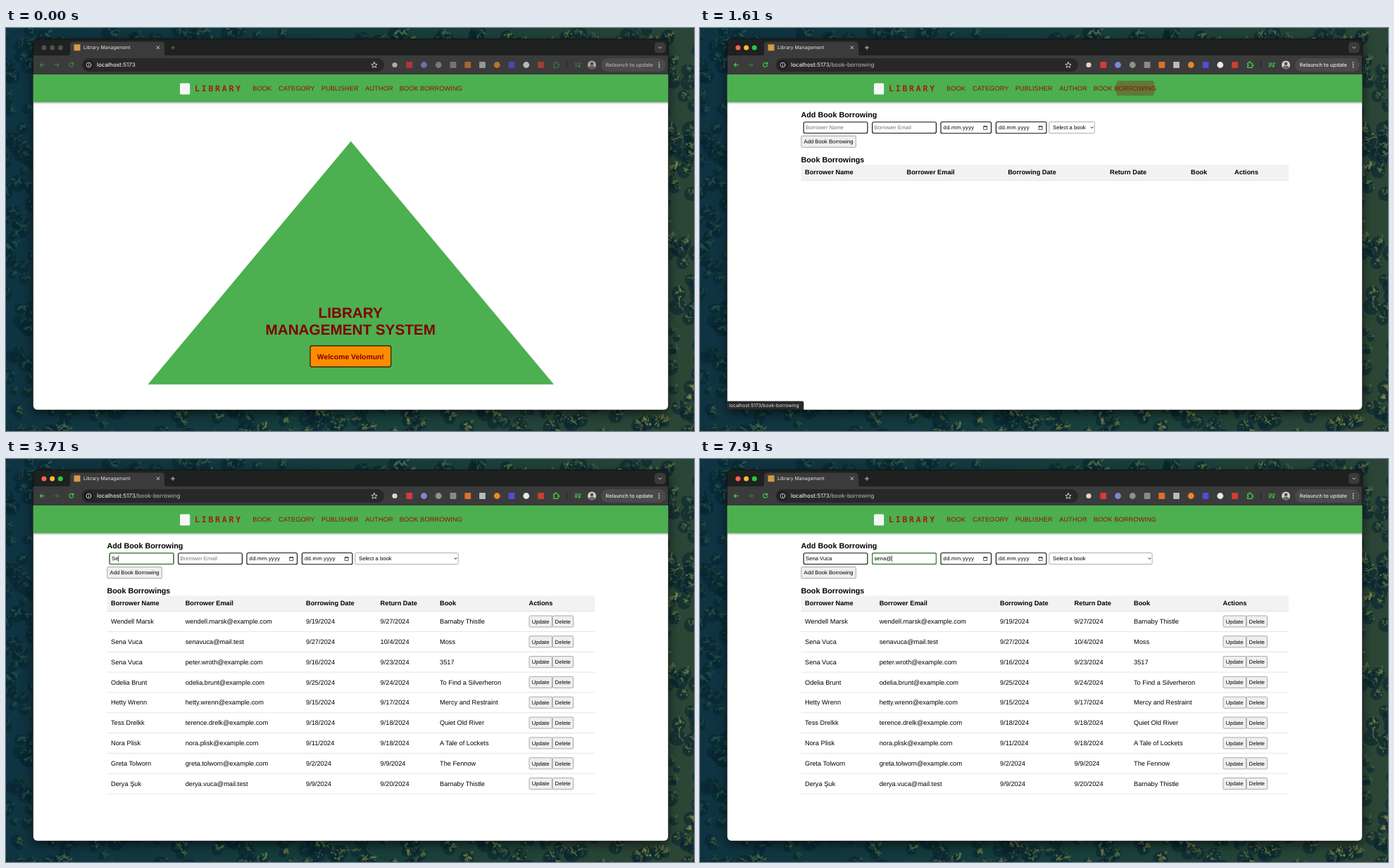
An HTML page with a canvas for the animation above (8000 ms loop, 977 px wide and 573 px high).

```html
<!DOCTYPE html>
<html lang="en">
<head>
<meta charset="utf-8">
<title>Library Management</title>
<style>
  html, body { margin: 0; width: 100%; height: 100%; overflow: hidden; background: #12333a; }
  canvas, svg { position: absolute; left: 0; top: 0; width: 977px; height: 573px; }
  svg text { white-space: pre; text-rendering: geometricPrecision; font-family: "Liberation Sans", Arial, sans-serif; }
  .shadow { filter: drop-shadow(0 5px 8px rgba(0, 0, 0, .6)); }
  .ui text { font-family: Inter, sans-serif; fill: #e8e8e8; }
  .line { fill: none; stroke: #dcdcdc; stroke-width: .9; stroke-linecap: round; stroke-linejoin: round; }
  .go { stroke: #3fd64a; stroke-width: 1.1; }
  .idle .go { stroke: #3c8a44; }
  .idle .lights circle { fill: #505050; }
  .idle .ext { opacity: .72; }
  .idle .relaunch text { fill: #b2b2b2; }
  .bar { fill: #4caf50; filter: drop-shadow(0 1.2px 1.6px rgba(0, 0, 0, .42)); }
  .nav { font-size: 9.23px; letter-spacing: .087px; fill: #930f05; }
  .brand { font: 700 11.5px "DejaVu Sans Mono", monospace !important; letter-spacing: 2.77px; fill: #a31c0b; }
  .hero { font-weight: 700; font-size: 20.7px; fill: #800000; text-anchor: middle; }
  .h3 { font-weight: 700; font-size: 10.79px; }
  .cell { font-size: 9.226px; }
  .th { font-weight: 700; }
  .small { font-size: 7.69px; }
  .hint { fill: #757575; }
  .field { fill: #fff; stroke: #111; stroke-width: 1.15; }
  .focus { fill: #fff; stroke: #43853d; stroke-width: 1.4; }
  .btn { fill: #efefef; stroke: #767676; stroke-width: .6; }
  .pick { fill: #fff; stroke: #767676; stroke-width: .6; }
</style>
</head>
<body>
<canvas id="forest" width="977" height="573"></canvas>
<svg id="stage" viewBox="0 0 977 573">
  <defs>
    <clipPath id="frame"><rect x="38.5" y="15.5" width="902" height="527.5" rx="6"/></clipPath>
    <clipPath id="link"><rect x="554.5" y="75" width="98.5" height="21.3" rx="2.3"/></clipPath>
  </defs>
  <rect class="shadow" x="38.5" y="15.5" width="902" height="527.5" rx="6"/>
  <g clip-path="url(#frame)">
    <rect x="38" y="66" width="903" height="478" fill="#fff"/>

    <g class="ui">
      <rect x="38" y="15" width="903" height="25" fill="#1f2020"/>
      <path d="M87 39.5q4 0 4-4V24.500q0-5 5-5h124q5 0 5 5V35.500q0 4 4 4z" fill="#3b3b3b"/>
      <rect x="38" y="39" width="903" height="27.500" fill="#3b3b3b"/>
      <g class="lights">
        <circle cx="54" cy="28" r="3.500" fill="#ff5f57"/>
        <circle cx="65.700" cy="28" r="3.500" fill="#febc2e"/>
        <circle cx="77.300" cy="28" r="3.500" fill="#28c840"/>
      </g>
      <rect x="96.500" y="23.300" width="9" height="9" fill="#d39a48"/>
      <text x="110" y="30.200" font-size="6.800">Library Management</text>
      <path class="line" d="M214 25.800l4 4m0-4l-4 4"/>
      <path id="plus" class="line" d="M234.500 28h5m-2.500-2.500v5"/>
      <rect x="921" y="20" width="15.500" height="15.500" rx="4.500" fill="#3a3a3a"/>
      <path class="line" d="M926.500 26.800l2.200 2.200 2.200-2.200"/>

      <path class="line go" d="M54.500 52.500h-6m2.700-2.700l-2.700 2.700 2.700 2.700"/>
      <path class="line" style="stroke:#3a8a42" d="M69 52.500h6m-2.700-2.700l2.700 2.700-2.700 2.700"/>
      <path class="line go" d="M95.300 50.700a3 3 0 1 0 .3 2.400M95.700 49v2.200h-2.200"/>
      <rect x="107.500" y="43" width="429.500" height="19" rx="9.500" fill="#282828"/>
      <circle cx="117.500" cy="52.500" r="6.700" fill="#1d1d1d"/>
      <circle class="line" cx="117.500" cy="52.500" r="3.400"/>
      <path class="line" d="M117.500 52.300v1.800m0-3.500v.1"/>
      <text x="129" y="55.300" font-size="8" font-weight="500" id="url">localhost<tspan fill="#d5d5d5">:5173</tspan><tspan id="path" fill="#bdbdbd" font-weight="400"></tspan></text>
      <path class="line" d="M523 48.500l1.200 2.700 2.900.3-2.200 1.900.7 2.900-2.600-1.500-2.600 1.500.7-2.900-2.200-1.900 2.900-.3z"/>
      <g class="ext" id="ext">
        <path class="line go" d="M777.500 49.800h2.200q-.3-2 1-2t1 2h2.200v2.100q1.800-.2 1.800 1t-1.800 1v2.500h-6.400v-2.300q1.400-.1 1.400-1.100t-1.400-1.100z"/>
        <path d="M796.500 48v9" stroke="#202020" stroke-width="1"/>
        <path class="line go" d="M808 50h5m-5 2.200h5m-5 2.200h2.800M815 49.700v4.800M815 49.700h1.500"/>
        <circle cx="814" cy="54.600" r="1.200" fill="#3fd64a"/>
        <circle cx="832" cy="52.500" r="6" fill="#d3d0c8"/>
        <path d="M827.500 56.500q.5-3 4.500-3t4.500 3q-1.700 2-4.500 2t-4.500-2z" fill="#6b6a68"/>
        <circle cx="832" cy="50.700" r="2.300" fill="#5d4a40"/>
      </g>
      <g class="relaunch">
        <rect x="845" y="43" width="92" height="19" rx="9.500" fill="#4a4a4a"/>
        <text x="851.500" y="55.200" font-size="7.300" font-weight="500">Relaunch to update</text>
        <g fill="#e0e0e0"><circle cx="927.500" cy="49.300" r=".9"/><circle cx="927.500" cy="52.500" r=".9"/><circle cx="927.500" cy="55.700" r=".9"/></g>
      </g>
    </g>

    <rect class="bar" x="36" y="66" width="907" height="39.300"/>
    <rect x="247" y="78.500" width="14.200" height="16" rx="1.500" fill="#f3f8f3"/>
    <text class="brand" x="268" y="90">LIBRARY</text>
    <g id="nav"></g>
    <g clip-path="url(#link)"><circle id="ripple" cx="618" cy="85.500" r="0" fill="#8b0000"/></g>

    <g data-on="0,1610">
      <path d="M489.700 161L778 506.700H201.500z" fill="#4caf50"/>
      <text class="hero" x="489.200" y="411.500">LIBRARY</text>
      <text class="hero" x="489.200" y="435.800">MANAGEMENT SYSTEM</text>
      <rect x="432" y="451.900" width="114.700" height="29.900" rx="2.500" fill="#ff8c00" stroke="#2a1600" stroke-width="1.150"/>
      <text class="hero" style="font-size:10.380px" x="489.300" y="470.600">Welcome Velomun!</text>
    </g>

    <g data-on="1610,8000">
      <text class="h3" x="143.500" y="127">Add Book Borrowing</text>
      <g id="form"></g>
      <rect class="btn" x="143.800" y="153.500" width="77.600" height="16.200" rx="1.500"/>
      <text class="small" x="147.500" y="164.400">Add Book Borrowing</text>
      <text class="h3" x="143.500" y="191.300">Book Borrowings</text>
      <rect x="143.500" y="194.300" width="692.500" height="22.300" fill="#f2f2f2"/>
      <path d="M143.500 216.600h692.500" stroke="#ddd" stroke-width=".8"/>
      <g id="empty" data-on="1610,1820"></g>
      <g id="full" data-on="1820,8000"></g>
    </g>

    <g id="status" class="ui">
      <path d="M38 530.500h107q2.300 0 2.300 2.300V544H38z" fill="#292929"/>
      <text x="41.300" y="539" font-size="6.780">localhost:5173/book-borrowing</text>
    </g>
  </g>
  <rect x="38.500" y="15.500" width="902" height="527.500" rx="6" fill="none" stroke="#0b0b0b" stroke-opacity=".6" stroke-width=".8"/>
</svg>

<script>
const LOOP = 8000;
const $ = id => document.getElementById(id);
const add = (id, html) => $(id).insertAdjacentHTML('beforeend', html);
const text = (cls, x, y, s) => `<text class="${cls}" x="${x}" y="${y}">${s}</text>`;
const box = (cls, x, y, w, h, r, more = '') =>
  `<rect class="${cls}" x="${x}" y="${y}" width="${w}" height="${h}" rx="${r}" ${more}/>`;
const clamp = v => Math.min(1, Math.max(0, v));

// Forest seen from above: teal on the left, olive toward the right and bottom
function paintForest() {
  const g = $('forest').getContext('2d');
  let seed = 41;
  const rnd = () => (seed = (seed * 16807) % 2147483647) / 2147483647;
  const mix = (a, b, k) => a.map((v, i) => Math.round(v + (b[i] - v) * k));
  const blob = (x, y, rx, ry, turn, c, alpha) => {
    g.fillStyle = `rgba(${c},${alpha})`;
    g.beginPath();
    g.ellipse(x, y, rx, ry, turn, 0, 7);
    g.fill();
  };
  const base = g.createLinearGradient(0, 0, 977, 120);
  base.addColorStop(0, '#0e3342');
  base.addColorStop(.6, '#173f3c');
  base.addColorStop(1, '#2c4636');
  g.fillStyle = base;
  g.fillRect(0, 0, 977, 573);
  for (let i = 0; i < 1500; i++) {
    const x = rnd() * 990, y = rnd() * 585, size = 5 + rnd() * 7;
    if (x > 55 && x < 922 && y > 32 && y < 526) continue;
    const warm = clamp(x / 1250 + (y > 500 ? .3 : 0));
    const leaf = mix([32, 86, 76], [146, 148, 68], warm);
    blob(x - 3, y + 3, size, size, 0, [9, 36, 48], .6);
    const lit = rnd();
    for (let k = 0; k < 9; k++) {
      const a = rnd() * 6.3, d = rnd() * size * .8;
      blob(x + Math.cos(a) * d, y + Math.sin(a) * d, 1 + rnd() * 2.6, .7 + rnd(), a,
        mix([16, 54, 54], leaf, lit * .7 + rnd() * .5), .75);
    }
  }
}

function buildToolbar() {
  const marks = [['#e3d6c6', 1], ['#d8383c'], ['#7f86d8', 1], ['#8d9488', 1], ['#8a8a8a'], ['#d9722a'],
    ['#b9bbb8'], ['#e8872b', 1], ['#4a4fd8'], ['#e9e9e9', 1], ['#c9412f']];
  marks.forEach(([color, round], i) => {
    const x = 552 + i * 20.75, r = i === 0 ? 3.6 : 4.4;
    add('ext', box('', x - r, 52.500 - r, 2 * r, 2 * r, round ? r : .8, `fill="${color}"`));
  });
  [['BOOK', 350.2], ['CATEGORY', 387], ['PUBLISHER', 447.7], ['AUTHOR', 510.2], ['BOOK BORROWING', 558.7]]
    .forEach(([s, x]) => add('nav', text('nav', x, 88.8, s)));
}

function buildForm() {
  const chevron = x =>
    `<path d="M${x} 140.500l1.800 1.900 1.800-1.900" fill="none" stroke="#111" stroke-width="1"/>`;
  const input = (id, x, hint, on) => add('form',
    box('field', x, 133.7, 90.7, 15.8, 2) +
    box('focus', x, 133.7, 90.7, 15.8, 2, `data-on="${on}"`) +
    `<text id="${id}" class="small" x="${x + 2.8}" y="144.200" data-hint="${hint}"></text>` +
    `<path id="${id}Caret" stroke="#000" stroke-width=".7"/>`);
  input('name', 147.2, 'Borrower Name', '2520,5740');
  input('mail', 244.7, 'Borrower Email', '5740,8000');
  for (const x of [342, 420.4])
    add('form', box('field', x, 133.5, 71.5, 16.2, 2) +
      `<text class="small" x="${x + 3.6}" y="144.200" letter-spacing=".28">dd.mm.yyyy</text>` +
      `<path d="M${x + 60.7} 139.600h5v4.800h-5zm0 .7h5M${x + 61.7} 139v1m3-1v1" fill="none" stroke="#111" stroke-width=".7"/>`);
  const select = (w, on) =>
    `<g data-on="${on}">${box('pick', 495.8, 133.5, w, 16.1, 1.7)}${chevron(490.4 + w)}</g>`;
  add('form', select(64.5, '1610,1820') + select(146.3, '1820,8000') +
    text('small', 501, 144.2, 'Select a book'));
}

function buildTable() {
  const heads = ['Borrower Name', 'Borrower Email', 'Borrowing Date', 'Return Date', 'Book', 'Actions'];
  const narrow = [149, 293.5, 437.2, 582, 697, 759];
  const wide = [149, 254.7, 426, 531.6, 616, 742.5];
  heads.forEach((s, i) => {
    add('empty', text('cell th', narrow[i], 208.1, s));
    add('full', text('cell th', wide[i], 208.1, s));
  });
  const rows = `Wendell Marsk|wendell.marsk@example.com|9/19/2024|9/27/2024|Barnaby Thistle
Sena Vuca|senavuca@mail.test|9/27/2024|10/4/2024|Moss
Sena Vuca|peter.wroth@example.com|9/16/2024|9/23/2024|3517
Odelia Brunt|odelia.brunt@example.com|9/25/2024|9/24/2024|To Find a Silverheron
Hetty Wrenn|hetty.wrenn@example.com|9/15/2024|9/17/2024|Mercy and Restraint
Tess Drelkk|terence.drelk@example.com|9/18/2024|9/18/2024|Quiet Old River
Nora Plisk|nora.plisk@example.com|9/11/2024|9/18/2024|A Tale of Lockets
Greta Tolworn|greta.tolworn@example.com|9/2/2024|9/9/2024|The Fennow
Derya Şuk|derya.vuca@mail.test|9/9/2024|9/20/2024|Barnaby Thistle`.split('\n');
  rows.forEach((row, i) => {
    const y = 216.6 + i * 28.83;
    row.split('|').forEach((s, c) => add('full', text('cell', wide[c], y + 17.5, s)));
    add('full', box('btn', 743, y + 6.3, 32.5, 16.1, 1.5) + text('small', 746.7, y + 17.2, 'Update') +
      box('btn', 776, y + 6.3, 29.5, 16.1, 1.5) + text('small', 779.6, y + 17.2, 'Delete') +
      `<path d="M143.500 ${y + 28.83}h692.500" stroke="#ddd" stroke-width=".8"/>`);
  });
}

const fields = [
  { id: 'name', value: 'Sena Vuca', from: 2520, to: 5740, blink: 2520,
    keys: [3360, 3710, 3850, 3990, 4130, 4620, 4830, 5040, 5110] },
  { id: 'mail', value: 'sena@', from: 5740, to: LOOP, blink: 5810,
    keys: [6510, 6650, 6790, 7000, 7910] },
];

function drawField(f, t) {
  const el = $(f.id), caret = $(f.id + 'Caret');
  const count = f.keys.filter(k => k <= t).length;
  el.textContent = count ? f.value.slice(0, count) : el.dataset.hint;
  el.classList.toggle('hint', !count);
  const last = count ? f.keys[count - 1] : f.blink;
  const lit = Math.floor(Math.max(0, t - last) / 490) % 2 === 0;
  const x = +el.getAttribute('x') + (count ? el.getComputedTextLength() : 0) + .3;
  caret.setAttribute('d', `M${x} 137.200v8.800`);
  caret.style.display = t >= f.from && t < f.to && lit ? '' : 'none';
}

function draw(t) {
  const idle = t < 700;
  $('stage').classList.toggle('idle', idle);
  $('plus').classList.toggle('go', idle);
  $('path').textContent = t < 1610 ? '' : '/book-borrowing';
  for (const [el, from, to] of timed) el.style.display = t >= from && t < to ? '' : 'none';

  const p = clamp((t - 1530) / 340);
  $('ripple').setAttribute('r', 66 * (1 - (1 - p) ** 2));
  $('ripple').style.opacity = .3 * (1 - clamp((t - 1620) / 550));
  $('status').style.opacity = clamp((t - 1190) / 120) * (1 - clamp((t - 2270) / 220));
  fields.forEach(f => drawField(f, t));
}

paintForest();
buildToolbar();
buildForm();
buildTable();
const timed = [...document.querySelectorAll('[data-on]')].map(el => [el, ...el.dataset.on.split(',').map(Number)]);

function tick() {
  draw(performance.now() % LOOP);
  requestAnimationFrame(tick);
}
tick();
</script>
</body>
</html>
```
